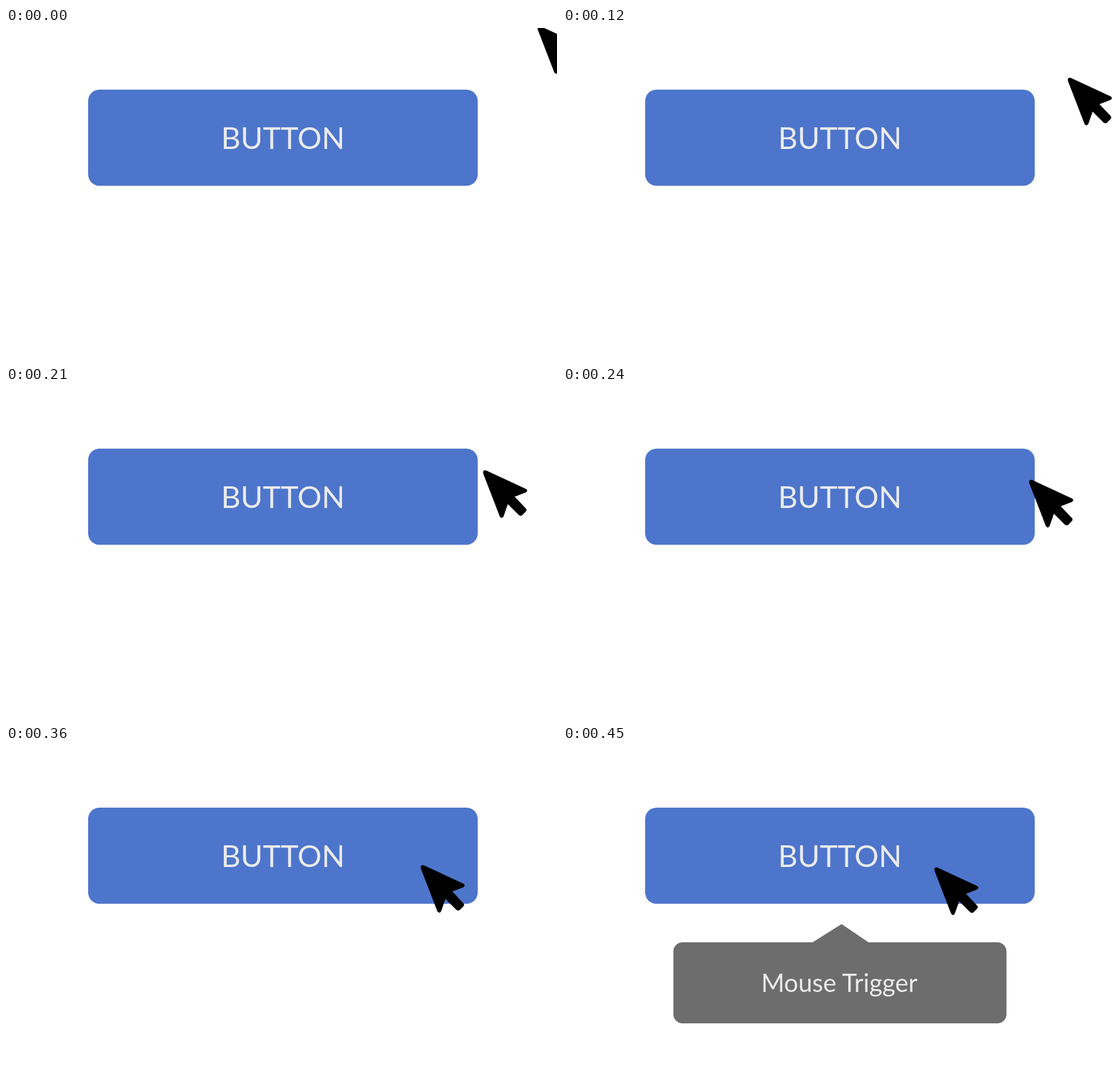
Write an HTML page that moves like this. It is 966 px wide and 580 px high and loops after 870 ms.

```html
<!DOCTYPE html>
<html lang="en">
<head>
<meta charset="utf-8">
<title>Tooltip on hover</title>
<style>
  html, body { margin: 0; width: 100%; height: 100%; overflow: hidden; background: #fff; }
  svg { display: block; width: 966px; height: 580px; }
  text { font-family: Lato, sans-serif; fill: #ebebeb; text-anchor: middle; }
</style>
</head>
<body>
<svg viewBox="0 0 966 580">
  <rect x="144" y="108" width="683" height="168.5" rx="20" fill="#4d75cb"/>
  <text x="485.5" y="211.5" font-size="53">BUTTON</text>
  <g id="tooltip" visibility="hidden">
    <path d="M436 345L488.5 312L537 345Z" fill="#6d6d6d"/>
    <rect x="193.5" y="344" width="584" height="142" rx="16" fill="#6d6d6d"/>
    <text x="484.5" y="430.5" font-size="44">Mouse Trigger</text>
  </g>
  <path id="cursor" d="M5.5 1L74.5 33Q80 36 75 39.5L55.5 47L75 67.5Q77.5 70.5 75 73L68.5 79.5Q65.5 81.5 62.5 79L43.5 60L36 81.5Q33 86.5 29.5 82L.5 7Q-1.5 -.5 5.5 1Z"/>
</svg>
<script>
const LOOP = 870, STEP = 30, ARRIVAL = 450, SPEED = 0.85;
const END = { x: 651, y: 212 };
const tooltip = document.getElementById('tooltip');
const cursor = document.getElementById('cursor');

// Direction of travel in radians: the path bends ever more tightly.
const heading = t => (67.7 - 0.066 * t - 0.00023 * t * t) * Math.PI / 180;

// Constant speed along the path, traced back from its end.
function cursorAt(time) {
  let { x, y } = END;
  for (let t = ARRIVAL; t > time; t--) {
    x += SPEED * Math.cos(heading(t - 0.5));
    y -= SPEED * Math.sin(heading(t - 0.5));
  }
  return { x, y };
}

function draw(now) {
  const time = Math.floor(now % LOOP / STEP) * STEP;
  const { x, y } = cursorAt(time);
  cursor.setAttribute('transform', `translate(${x} ${y})`);
  tooltip.setAttribute('visibility', time >= ARRIVAL ? 'visible' : 'hidden');
}

let start;
function tick(now) {
  start ??= now;
  draw(now - start);
  requestAnimationFrame(tick);
}
draw(0);
requestAnimationFrame(tick);
</script>
</body>
</html>
```
